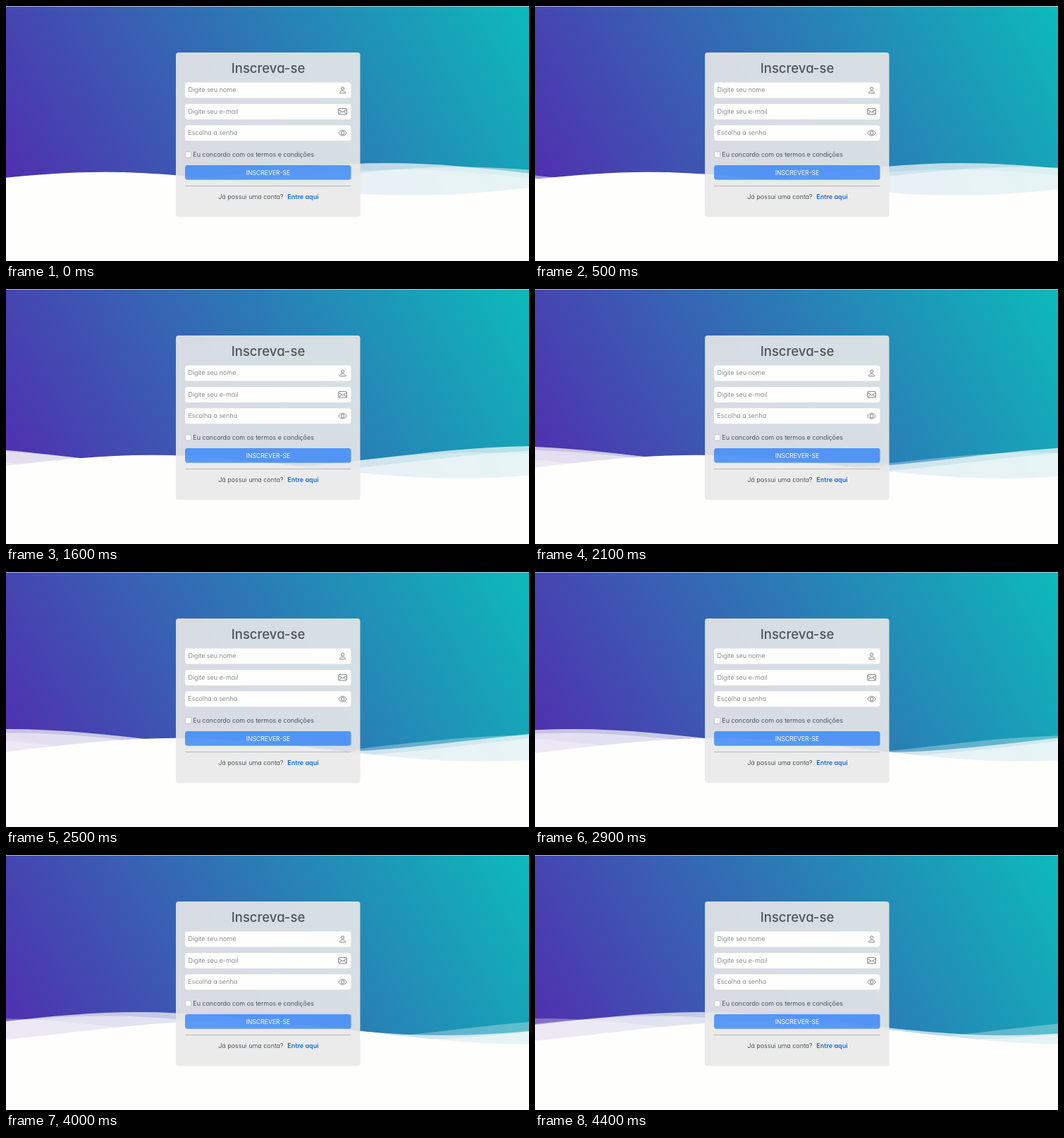
An HTML page with a canvas for the animation above (4500 ms loop, 742 by 362 pixels).

```html
<!DOCTYPE html>
<html lang="pt-BR">
<head>
<meta charset="utf-8">
<title>Inscreva-se</title>
<style>
  html, body { margin: 0; width: 100%; height: 100%; overflow: hidden; background: #fefefc; }
  canvas, svg { position: absolute; left: 0; top: 0; width: 742px; height: 362px; display: block; }
  text { font: 300 9px Inter, "Open Sans", sans-serif; font-feature-settings: "cv11"; fill: #2b3035; }
  .title { font-size: 18.5px; font-weight: 500; fill: #505359; }
  .hint { fill: #6c7076; }
  .mid { text-anchor: middle; }
  .button { fill: #fff; font-weight: 400; font-size: 8.6px; }
  .link { fill: #166cdc; font-weight: 600; }
  .field { fill: #fefefc; }
  .icon { fill: none; stroke: #6f7276; stroke-width: 1.1; stroke-linejoin: round; }
</style>
</head>
<body>
<canvas id="stage" width="742" height="362"></canvas>
<svg viewBox="0 0 742 362">
  <rect x="241" y="66" width="261.5" height="233.5" rx="4" fill="#e9e9e9" fill-opacity=".9"/>
  <text class="title mid" x="372" y="95.3">Inscreva-se</text>

  <rect class="field" x="254" y="108.5" width="235.5" height="22" rx="3.5"/>
  <rect class="field" x="254" y="139" width="235.5" height="22" rx="3.5"/>
  <rect class="field" x="254" y="169.3" width="235.5" height="22" rx="3.5"/>
  <text class="hint" x="258.5" y="122.4">Digite seu nome</text>
  <text class="hint" x="258.5" y="152.9">Digite seu e-mail</text>
  <text class="hint" x="258.5" y="183.3">Escolha a senha</text>

  <g class="icon" transform="translate(471.4 113.2) scale(.78)">
    <circle cx="8" cy="5" r="2.6"/>
    <path d="M2.5 13c0-1.2 1.3-3.6 5.500-3.600s5.500 2.400 5.500 3.600q0 .5-.5.5h-10q-.5 0-.5-.5z"/>
  </g>
  <g class="icon" transform="translate(471.4 143.500) scale(.78)">
    <rect x=".5" y="2.500" width="15" height="11" rx="1.500"/>
    <path d="M.5 4.700 8 9.200l7.500-4.500M.7 12.800l5.600-4.600M15.300 12.800l-5.600-4.600"/>
  </g>
  <g class="icon" transform="translate(471.4 174) scale(.78)">
    <path d="M.6 8Q3.500 3 8 3t7.400 5Q12.500 13 8 13T.6 8z"/>
    <circle cx="8" cy="8" r="3"/>
  </g>

  <rect x="254.500" y="206.800" width="8.200" height="8.200" rx="2" fill="#fefefc" stroke="#000" stroke-opacity=".25" stroke-width=".6"/>
  <text x="265.300" y="213.800">Eu concordo com os termos e condições</text>

  <rect x="254" y="226" width="235.500" height="20.800" rx="3.500" fill="#0d6efd" fill-opacity=".65"/>
  <text class="button mid" x="372" y="239.500">INSCREVER-SE</text>
  <rect x="254" y="255" width="235.500" height="1" fill="#000" fill-opacity=".22"/>
  <text x="301.200" y="274">Já possui uma conta?</text>
  <text class="link" x="399.300" y="274">Entre aqui</text>
</svg>
<script>
const ctx = document.getElementById("stage").getContext("2d");
const W = 742, H = 362, LOOP = 4500, STEP = 100, START = 91;
const TOP = 219.2, SEA = 51.5, UX = W / 150, UY = SEA / 28;

// drop: vertical offset in wave units; period and lead in seconds
const waves = [
  { drop: 0, alpha: 0.7, period: 7, lead: 2 },
  { drop: 3, alpha: 0.5, period: 10, lead: 3 },
  { drop: 5, alpha: 0.3, period: 13, lead: 4 },
  { drop: 7, alpha: 1, period: 20, lead: 5 }
];

const bezier = (a, b, s) => 3 * a * s * (1 - s) ** 2 + 3 * b * s * s * (1 - s) + s ** 3;

// cubic-bezier(.55, .5, .45, .5)
function ease(p) {
  let lo = 0, hi = 1;
  for (let i = 0; i < 24; i++) {
    const mid = (lo + hi) / 2;
    if (bezier(0.55, 0.45, mid) < p) lo = mid; else hi = mid;
  }
  return bezier(0.5, 0.5, lo);
}

const sky = (() => {
  const h = TOP + SEA, ax = Math.sin(Math.PI / 3), ay = -0.5;
  const half = (W * ax + h * 0.5) / 2;
  const g = ctx.createLinearGradient(
    W / 2 - ax * half, h / 2 - ay * half, W / 2 + ax * half, h / 2 + ay * half);
  g.addColorStop(0, "#512daf");
  g.addColorStop(1, "#0cbaba");
  return g;
})();

function drawWave({ drop, alpha, period, lead }, time) {
  const shift = -90 + 175 * ease(((time + lead) % period) / period);
  const px = x => (x + shift) * UX;
  const py = y => TOP + (y + drop - 24) * UY;
  let x = -112, y = 44;
  ctx.beginPath();
  ctx.moveTo(px(x), py(y));
  for (let i = 0; i < 4; i++) {
    const next = 70 - y;
    ctx.bezierCurveTo(px(x + 30), py(y), px(x + 58), py(next), px(x + 88), py(next));
    x += 88;
    y = next;
  }
  ctx.lineTo(px(x), py(88));
  ctx.lineTo(px(-112), py(88));
  ctx.fillStyle = `rgba(254,254,252,${alpha})`;
  ctx.fill();
}

function draw(ms) {
  const time = START + Math.floor((ms % LOOP) / STEP) * STEP / 1000;
  ctx.fillStyle = "#fefefc";
  ctx.fillRect(0, 0, W, H);
  ctx.fillStyle = sky;
  ctx.fillRect(0, 0, W, TOP + SEA);
  ctx.fillStyle = "rgba(225,225,230,.7)";
  ctx.fillRect(0, 0, W, 1);
  waves.forEach(w => drawWave(w, time));
}

const begin = performance.now();
function frame() {
  draw(performance.now() - begin);
  requestAnimationFrame(frame);
}
frame();
</script>
</body>
</html>
```
